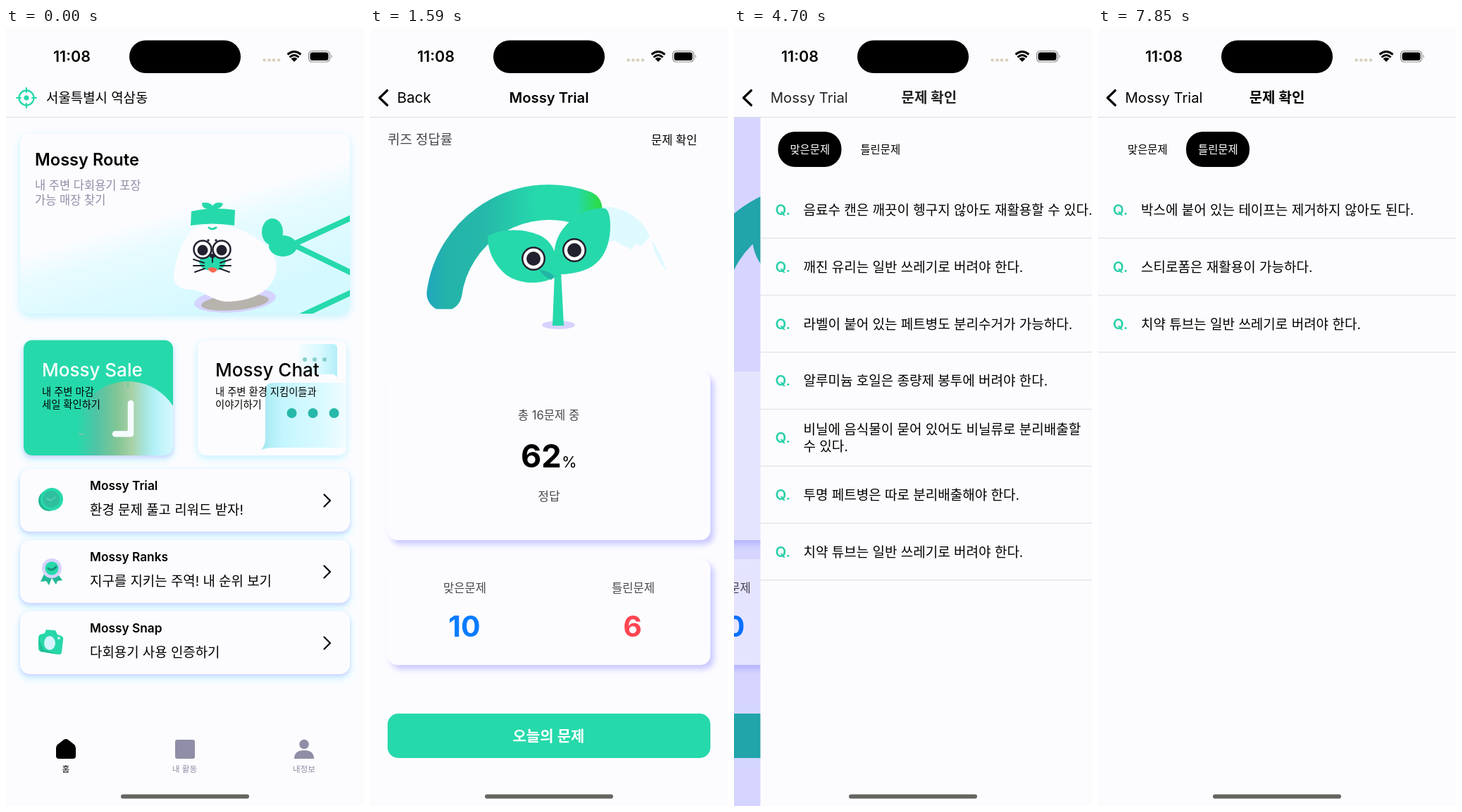
These frames come from a looping animation (508x1103 px, 8000 ms). An HTML page:

```html
<!DOCTYPE html>
<html lang="ko">
<head>
<meta charset="utf-8">
<title>Recycling quiz app</title>
<style>
  html, body { margin: 0; width: 100%; height: 100%; overflow: hidden; background: #fcfcff; }
  svg { display: block; width: 100%; height: 100%; font-family: Inter, "Noto Sans CJK KR", "Noto Sans CJK", sans-serif; }
  text { white-space: pre; }
  .green { fill: var(--green, #26d9ab); }
  .line { fill: none; stroke-linecap: round; stroke-linejoin: round; }
  .dim { fill: #dad9ff; mix-blend-mode: multiply; }
</style>
</head>
<body>
<svg id="stage" viewBox="0 0 508 1103"></svg>
<script>
const PAGE = '#fcfcff', GREEN = '#26d9ab', INK = '#23202f', GREY = '#8f8ea6', SOFT = '#48484e';
const LOOP = 8000, STEP = 56.6;

const text = (x, y, size, str, { fill = '#000', weight = 400, anchor = 'start', id = '' } = {}) =>
  `<text ${id && `id="${id}"`} x="${x}" y="${y}" font-size="${size}" font-weight="${weight}" fill="${fill}" text-anchor="${anchor}">${str}</text>`;
const mid = (x, y, size, str, opts) => text(x, y, size, str, { ...opts, anchor: 'middle' });
const box = (x, y, w, h, r, attrs) => `<rect x="${x}" y="${y}" width="${w}" height="${h}" rx="${r}" ${attrs}/>`;
const oval = (x, y, rx, ry, attrs) => `<ellipse cx="${x}" cy="${y}" rx="${rx}" ry="${ry}" ${attrs}/>`;
const disc = (x, y, r, attrs) => oval(x, y, r, r, attrs);
const path = (d, attrs) => `<path d="${d}" ${attrs}/>`;
const line = (d, stroke, width) => path(d, `class="line" stroke="${stroke}" stroke-width="${width}"`);
const rule = y => box(0, y, 508, 1, 0, 'fill="#dbdbe4"');
const gradient = (id, coords, stops) => `<linearGradient id="${id}" gradientUnits="userSpaceOnUse" ${coords}>` +
  stops.map(([at, color]) => `<stop offset="${at}" stop-color="${color}"/>`).join('') + '</linearGradient>';
const shadow = (id, ...layers) => `<filter id="${id}" x="-10%" y="-25%" width="120%" height="155%">` +
  layers.map(([dx, dy, blur, color]) => `<feDropShadow dx="${dx}" dy="${dy}" stdDeviation="${blur}" flood-color="${color}"/>`).join('') + '</filter>';

const defs = `<defs>
  ${shadow('glow', [0, 4, 6, '#c2f3ff'])}
  ${shadow('lift', [0, 3, 2.5, '#d3d5ff'], [0, 3, 5, '#c6f4ff'])}
  ${shadow('lilac', [5, 6, 4, '#c9c7ff'])}
  ${gradient('guide', 'x1="200" y1="150" x2="275" y2="405"', [[0, PAGE], [.43, PAGE], [.6, '#e6fbff'], [1, '#d4f9ff']])}
  ${gradient('clock', 'x1="100" y1="0" x2="238" y2="0"', [[0, GREEN], [.2, '#4fc4a6'], [.42, '#83c596'], [.57, '#a8d1a6'], [.7, '#a6e4dc'], [.8, '#b4f1f8'], [1, '#d8f8ff']])}
  ${gradient('bubble', 'x1="364" y1="0" x2="483" y2="0"', [[0, '#a5e7f0'], [.25, '#c5f6ff'], [.7, '#d9faff'], [1, '#f2fcff']])}
  ${gradient('smallBubble', 'x1="415" y1="0" x2="470" y2="0"', [[0, '#f4fcff'], [.6, '#d5f8ff'], [1, '#b3eef8']])}
  ${gradient('arc', 'x1="79" y1="0" x2="323" y2="0"', [[0, '#1fa6c0'], [.12, '#24b3aa'], [.35, '#25b9a9'], [.65, GREEN], [.88, GREEN], [1, '#2bdc4c']])}
  <clipPath id="guideClip">${box(20, 150, 468, 255, 14, '')}</clipPath>
  <clipPath id="clubClip">${box(25, 442.5, 212, 163.5, 12, '')}</clipPath>
  <clipPath id="arcClip">${box(70, 200, 370, 198.5, 0, '')}</clipPath>
  <clipPath id="backClip">${box(30, 80, 478, 44, 0, '')}</clipPath>
</defs>`;

const mascot = `
  ${oval(325, 386, 58, 17, 'fill="#d5d3ff" transform="rotate(-5 325 386)"')}
  ${oval(325, 389, 48, 11, 'fill="#b7b3ad" transform="rotate(-5 325 389)"')}
  ${path('M238 352C240 326 250 303 263 287Q292 270 326 284C350 292 383 310 384 338C383 372 350 388 312 388C292 386 280 372 264 371Q238 371 238 352Z', 'fill="#fcfcff"')}
  ${path('M263 260Q292 253 325 258L324 280Q292 275 262 280Z', 'class="green"')}
  ${path('M292 257Q278 258 278 248Q289 246 293 252Q299 245 308 249Q306 257 292 257Z', 'class="green"')}
  ${line('M288 283Q292 287 298 283', GREEN, 3)}
  ${path('M292 323Q277 317 274 332Q277 345 292 343Q309 346 312 331Q308 316 292 323Z', 'class="green"')}
  ${path('M286 341Q293 337 300 342Q294 352 286 341Z', 'fill="#ff6650"')}
  ${[279, 306].map(x => disc(x, 314, 12.5, `fill="#fff" stroke="${INK}" stroke-width="2.5"`) + disc(x, 315, 7.5, `fill="${INK}"`)).join('')}
  ${oval(293, 323, 4, 3, `fill="${INK}"`)}
  ${line('M266 328L281 333M266 337L281 337M268 346L282 341M319 328L304 333M319 337L304 337M317 346L303 341M293 324V332', INK, 2)}
  ${disc(287, 301, 1.7, `fill="${INK}"`)}${disc(298, 301, 1.7, `fill="${INK}"`)}
  ${line('M405 308L492 268M405 306L492 348M415 410L492 374', GREEN, 8)}
  ${oval(378, 289, 15, 19, 'class="green"')}${oval(393, 309, 20, 15, 'class="green"')}`;

const rowIcons = [
  disc(61, 670, 15, 'fill="#20b895"') + oval(65, 668, 16, 16, 'class="green"') +
    disc(64, 668, 12, 'fill="#2fbf9e"') + line('M58 667L63 670L70 665', '#5fd6b5', 1.5),
  path('M55 772L49 785L57 784L61 790L66 777ZM72 772L80 783L73 784L71 789L63 777Z', 'fill="#22b896"') +
    disc(65, 766, 14, 'fill="#d6d3fb"') + disc(65, 766, 9.5, 'class="green"') + line('M60 766Q65 771 71 764', '#1b8f7c', 3),
  path('M48 860L55 858L57 853L70 854L73 860L79 862Q82 864 81 868L79 885Q78 889 74 888L49 884Q46 883 46 879V863Z', 'fill="#27d7a9"') +
    path('M46 866L49 884L74 888L53 881Z', 'fill="#1ebd93"') + oval(62, 872, 8, 10, 'fill="#d5f5ff"') + disc(75, 865, 2, 'fill="#bff5e4"'),
];
const homeRows = [
  ['Mossy Trial', '환경 문제 풀고 리워드 받자!'],
  ['Mossy Ranks', '지구를 지키는 주역! 내 순위 보기'],
  ['Mossy Snap', '다회용기 사용 인증하기'],
].map(([name, note], i) => {
  const y = 625 + 101 * i;
  return box(20, y, 468, 89, 14, `fill="${PAGE}" filter="url(#lift)"`) + rowIcons[i] +
    text(119, y + 30, 17.3, name, { weight: 600 }) + text(119, y + 65, 18.9, note) +
    line(`M451.5 ${y + 36.5}L460 ${y + 45}L451.5 ${y + 53.5}`, '#000', 2.2);
}).join('');

const home = `
  ${box(20, 150, 468, 255, 14, 'fill="url(#guide)" filter="url(#glow)"')}
  <g clip-path="url(#guideClip)">${mascot}</g>
  ${text(41, 195, 23.6, 'Mossy Route', { weight: 600 })}
  ${text(41, 229, 16.5, '내 주변 다회용기 포장', { fill: GREY })}
  ${text(41, 250, 16.5, '가능 매장 찾기', { fill: GREY })}
  ${box(25, 442.5, 212, 163.5, 12, 'class="green" filter="url(#lift)"')}
  <g clip-path="url(#clubClip)">${disc(173, 577, 76, 'fill="url(#clock)"')}
    ${line('M173 503V509M104 576H110', '#75c7a8', 2)}${line('M177 532V575.5H155', '#f6fbff', 8.5)}</g>
  ${text(51, 494, 26, 'Mossy Sale', { fill: '#fff', weight: 500 })}
  ${text(51, 521, 14.3, '내 주변 마감')}${text(51, 539, 14.3, '세일 확인하기')}
  ${box(272, 442.5, 211, 163.5, 12, `fill="${PAGE}" filter="url(#glow)"`)}
  ${path('M421 448H464Q470 448 470 454V495L465 491H421Q415 491 415 485V454Q415 448 421 448Z', 'fill="url(#smallBubble)"')}
  ${path('M379 503H483V595H377Q370 595 362 598Q368 592 368 580V515Q368 503 379 503Z', 'fill="url(#bubble)"')}
  ${[424, 438, 452].map(x => disc(x, 470, 3, 'fill="#85cfcd"')).join('')}
  ${[405.5, 435.5, 465.5].map(x => disc(x, 546, 7, 'fill="#27b8aa"')).join('')}
  ${text(297, 494, 26, 'Mossy Chat', { weight: 500 })}
  ${text(297, 521, 14.3, '내 주변 환경 지킴이들과')}${text(297, 539, 14.3, '이야기하기')}
  ${homeRows}
  ${path('M82 1009Q85 1007 88 1009L97 1016Q99 1018 99 1021V1032Q99 1036 95 1036H75Q71 1036 71 1032V1021Q71 1018 73 1016Z', '')}
  ${box(240, 1009, 28, 27, 3, `fill="${GREY}"`)}
  ${disc(423, 1015.5, 6.8, `fill="${GREY}"`)}${path('M409 1036Q409 1024 423 1024Q437 1024 437 1036Z', `fill="${GREY}"`)}
  ${mid(85, 1055, 11.7, '홈')}${mid(253.5, 1055, 11.7, '내 활동', { fill: GREY })}${mid(423, 1055, 11.7, '내정보', { fill: GREY })}`;

const eye = (x, y) => disc(x, y, 17, `fill="${INK}"`) + disc(x, y, 14.5, 'fill="#fff"') + disc(x, y, 10, `fill="${INK}"`);
const quiz = `
  ${text(25, 165, 18.9, '퀴즈 정답률', { fill: SOFT })}
  ${text(399, 165, 16.5, '문제 확인', { id: 'review', weight: 500 })}
  ${path('M346 267L371 267L412 321L371 348Q350 320 346 300Z', 'id="faintEarly" fill="#dffaff"')}
  ${path('M330 253Q376 254 397 294L386 309L377 306L371 314L357 307L346 301L336 305ZM399 301Q413 318 421 345Q405 327 399 301Z', 'id="faintLate" fill="#dffaff"')}
  <g clip-path="url(#arcClip)"><path id="gauge" class="line" stroke-width="50"/></g>
  ${oval(267.5, 421, 23.5, 6, 'fill="#d5d3fd"')}
  ${path('M262 346H271L275 422H259Z', 'class="green"')}
  ${path('M167 295C190 283 222 284 245 296Q262 307 265 330V352C240 366 211 363 192 349Q167 327 167 295Z', 'class="green"')}
  ${path('M263 349C258 316 262 293 285 273C303 258 322 254 334 256Q341 260 341 283C340 313 328 337 299 345Q283 350 263 349Z', 'class="green"')}
  ${path('M240 343Q256 344 262 353L257 357Q246 352 240 343Z', 'fill="#23b5a5"')}
  ${eye(232, 327)}${eye(290, 315)}
  ${box(25, 487, 458, 239, 14, `fill="${PAGE}" filter="url(#lilac)"`)}
  ${mid(253.5, 555, 16.6, '총 16문제 중', { fill: SOFT })}
  ${text(214, 623, 45, '62', { weight: 700 })}${text(272, 623, 22, '%')}
  ${mid(254, 670, 17, '정답', { fill: SOFT })}
  ${box(25, 753, 458, 150, 14, `fill="${PAGE}" filter="url(#lilac)"`)}
  ${mid(134.5, 800, 16.6, '맞은문제', { fill: SOFT })}${mid(373.5, 800, 16.6, '틀린문제', { fill: SOFT })}
  ${mid(134, 863, 41, '10', { fill: '#087cff', weight: 700 })}${mid(372.5, 863, 41, '6', { fill: '#ff4552', weight: 700 })}
  ${box(25, 972, 458, 63, 15, 'class="green"')}
  ${mid(253.5, 1011, 21, '오늘의 문제', { fill: '#fff', weight: 600 })}`;

const questions = list => list.map((lines, i) => {
  const y = 265 + 80.8 * i, top = lines.length > 1 ? y - 12 : y;
  return text(21, y, 20.5, 'Q.', { fill: '#29d0a8', weight: 600 }) +
    lines.map((str, n) => text(61, top + 24 * n, 19, str)).join('') + rule(y + 32.5);
}).join('');
const tabs = active => [25, 125].map((x, i) =>
  (i === active ? box(x, 147, 90, 50, 24, '') : '') +
  text(x + 17, 177.5, 15.4, ['맞은문제', '틀린문제'][i], { fill: i === active ? '#fff' : '#000', id: i > active ? 'wrongTab' : '' })).join('');
const toothpaste = ['치약 튜브는 일반 쓰레기로 버려야 한다.'];
const review = `
  <g id="correct">${tabs(0)}${questions([
    ['음료수 캔은 깨끗이 헹구지 않아도 재활용할 수 있다.'],
    ['깨진 유리는 일반 쓰레기로 버려야 한다.'],
    ['라벨이 붙어 있는 페트병도 분리수거가 가능하다.'],
    ['알루미늄 호일은 종량제 봉투에 버려야 한다.'],
    ['비닐에 음식물이 묻어 있어도 비닐류로 분리배출할', '수 있다.'],
    ['투명 페트병은 따로 분리배출해야 한다.'],
    toothpaste])}</g>
  <g id="wrong">${tabs(1)}${questions([
    ['박스에 붙어 있는 테이프는 제거하지 않아도 된다.'],
    ['스티로폼은 재활용이 가능하다.'],
    toothpaste])}</g>`;

const header = `
  ${box(0, 0, 508, 127, 0, `fill="${PAGE}"`)}${rule(126)}
  <g id="place">${disc(29, 99, 10.5, `fill="none" stroke="${GREEN}" stroke-width="2.3"`)}${disc(29, 99, 3.6, 'class="green"')}
    ${line('M29 85V91M29 107V113M15 99H21M37 99H43', GREEN, 2.2)}${text(57, 105.5, 18.9, '서울특별시 역삼동')}</g>
  <g clip-path="url(#backClip)">${text(38.5, 106, 20.6, 'Back', { id: 'back' })}</g>
  ${text(38.5, 106, 20.3, 'Mossy Trial', { id: 'backTrial' })}
  ${mid(254, 106, 20.3, 'Mossy Trial', { id: 'trialTitle', weight: 600 })}
  ${mid(254, 106, 20, '문제 확인', { id: 'reviewTitle', weight: 600 })}
  <g id="chevron">${line('M24.5 88.5L13.5 99L24.5 109.5', '#000', 3.2)}</g>
  ${text(67, 48, 21.5, '11:08', { weight: 600 })}
  ${box(175, 17.5, 158, 46.5, 23, '')}
  ${[366.5, 373.5, 380, 387].map(x => disc(x, 45.5, 2.3, 'fill="#d6d0bd"')).join('')}
  ${path('M409 48L404.5 43.5Q409 40 413.5 43.5Z', '')}
  ${path('M402.5 41.5Q409 35.5 415.5 41.5M399.5 37.5Q409 29.5 418.5 37.5', 'fill="none" stroke="#000" stroke-width="3"')}
  ${box(429.5, 32.5, 30, 15.5, 5, 'fill="none" stroke="#8c8c8c" stroke-width="1.2"')}
  ${box(431.5, 34.5, 26, 11.5, 3.5, '')}${path('M461.5 37.5Q464 40 461.5 43Z', 'fill="#8c8c8c"')}`;

const $ = id => document.getElementById(id);
const cover = attrs => box(0, 127, 508, 976, 0, attrs);
// Each page can darken its background alone (Back) or everything on it (Dim).
const page = (id, content) => `<g id="${id}">${cover(`fill="${PAGE}"`)}${cover(`id="${id}Back" class="dim"`)}${content}${cover(`id="${id}Dim" class="dim"`)}</g>`;
$('stage').innerHTML = `${defs}${box(0, 0, 508, 1103, 0, `fill="${PAGE}"`)}
  ${page('home', home)}${page('quiz', quiz)}<g id="list">${cover(`fill="${PAGE}"`)}${review}</g>
  ${header}${box(163, 1086.5, 182, 6, 3, 'fill="#666562"')}`;

const clamp = v => Math.min(1, Math.max(0, v));
const held = (t, start) => t < start ? t : start + Math.floor((t - start) / STEP) * STEP;
// Critically damped spring, as in a navigation push.
const push = (t, start) => {
  const w = Math.max(0, t - start) * .015, p = 1 - (1 + w) * Math.exp(-w);
  return p > .998 ? 1 : p;
};
const show = (id, opacity, dx = 0) => {
  $(id).setAttribute('opacity', opacity);
  $(id).setAttribute('transform', `translate(${dx} 0)`);
};
const showPage = (id, enter, leave) => {
  show(id, leave < 1 ? 1 : 0, 508 * (1 - enter) - 152.4 * leave);
  show(id + 'Back', leave / 2);
  show(id + 'Dim', leave ** 6);
};
const onArc = degrees => {
  const a = degrees * Math.PI / 180;
  return `${254 + 150 * Math.cos(a)} ${397 - 150 * Math.sin(a)}`;
};

function render(t) {
  const first = held(t, 500), second = held(t, 4350), third = held(t, 7340);
  const p = push(first, 530), q = push(second, 4405);
  const fill = (1 - Math.cos(Math.PI * clamp((first - 640) / 950))) / 2;
  const swap = clamp((third - 7340) / 280);

  showPage('home', 1, p);
  showPage('quiz', p, q);
  show('list', 1, 508 * (1 - q));

  const moving = q > .05 && q < 1;
  $('quiz').style.setProperty('--green', moving ? '#25b5ab' : GREEN);
  $('gauge').setAttribute('stroke', moving ? '#25b5ab' : 'url(#arc)');
  $('gauge').setAttribute('d', `M${onArc(172)}A150 150 0 0 1 ${onArc(171.9 - 101.6 * fill)}`);
  show('faintEarly', fill < .5 ? 1 : 0);
  show('faintLate', fill < .5 || moving ? 0 : 1);
  show('review', t >= 4180 ? .3 : 1);

  show('place', 1 - p);
  show('chevron', p);
  show('back', p * p * (1 - q), 47 * (1 - p) - 74 * q);
  show('trialTitle', p * p * (1 - q) ** 2, 310 * (1 - p) - 145 * q);
  show('backTrial', q * q, 180 * (1 - q));
  show('reviewTitle', q * q, 310 * (1 - q));

  show('wrongTab', t >= 7170 ? .3 : 1);
  show('correct', 1 - swap);
  show('wrong', swap);
}

const start = performance.now();
(function frame() {
  render((performance.now() - start) % LOOP);
  requestAnimationFrame(frame);
})();
</script>
</body>
</html>
```
